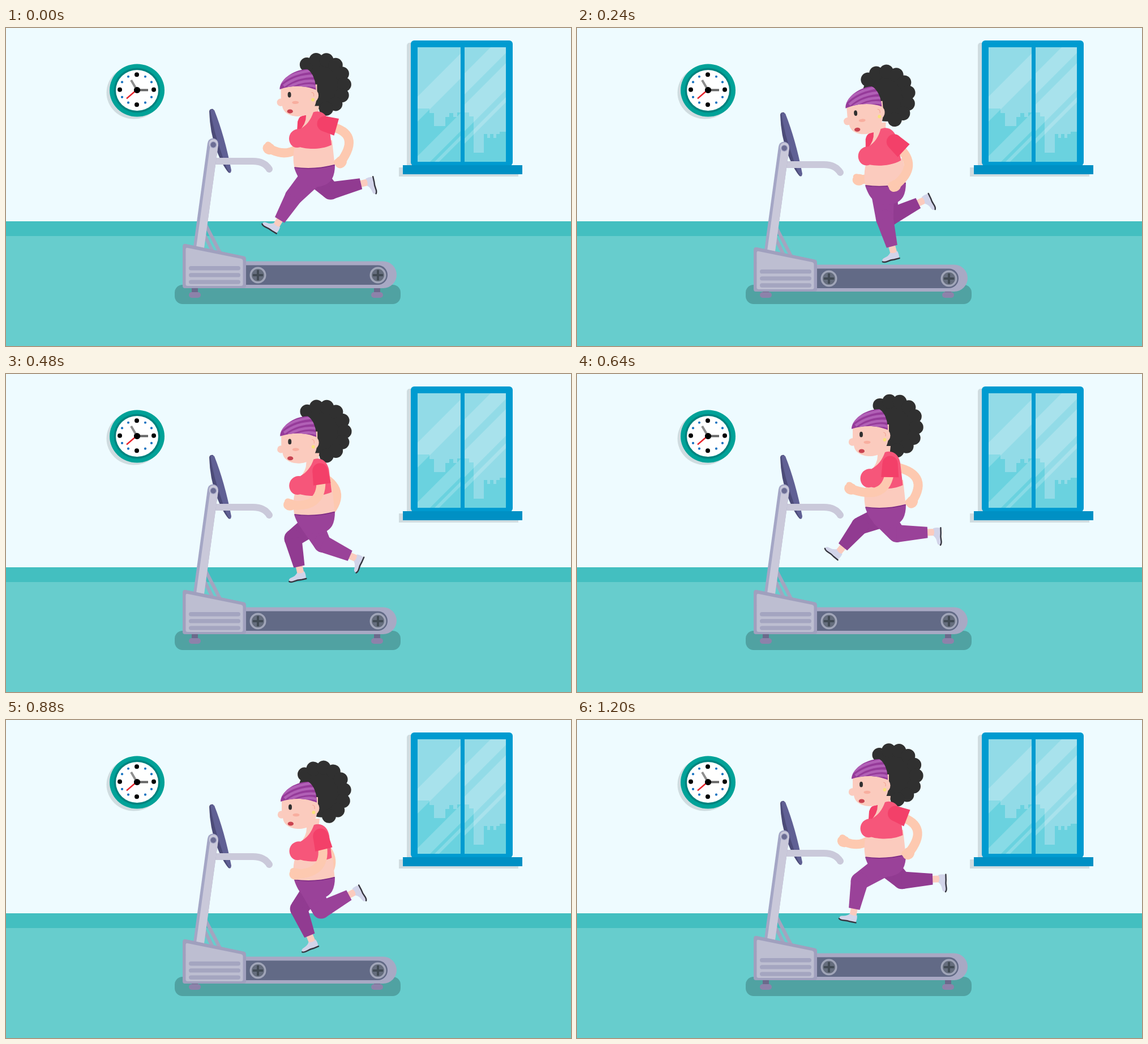
Recreate the animation shown at these times as an HTML page with a canvas. Size 998x561 px, loop 1.28 s.

```html
<!DOCTYPE html>
<html lang="en">
<head>
<meta charset="utf-8">
<title>Treadmill run</title>
<style>
html, body { margin: 0; width: 100%; height: 100%; overflow: hidden; background: #eefbff; }
canvas { display: block; width: 100vw; height: 100vh; }
</style>
</head>
<body>
<canvas id="stage" width="998" height="561"></canvas>
<script>
const g = document.getElementById('stage').getContext('2d');
const STEP = 80, COUNT = 16, RAD = Math.PI / 180;
const SKIN = '#fbcbbe', ARM = '#fdc9b0', NEAR = '#9a4299', FAR = '#913b91';
const TOP = '#f6567a', SLEEVE = '#f34069', HAIR = '#303030';

// Periodic smooth curve through a few [step, value] keys
function curve(times, values) {
  const n = times.length;
  const time = i => times[(i + n) % n] + Math.floor(i / n) * COUNT;
  const value = i => values[(i + n) % n];
  const slope = i => (value(i + 1) - value(i - 1)) / (time(i + 1) - time(i - 1));
  return s => {
    let i = n - 1;
    while (times[i] > s) i--;
    const h = time(i + 1) - time(i), u = (s - time(i)) / h, v = 1 - u;
    return value(i) * (1 + 2 * u) * v * v + value(i + 1) * u * u * (3 - 2 * u) +
      h * (slope(i) * u * v * v - slope(i + 1) * u * u * v);
  };
}

// Body height in pixels, limb angles in degrees from straight down, forward positive
const drop = curve([0, 2, 5, 8, 11, 13, 14, 15], [0, 35, 12, -11, 36, 3, -12, -4]);
const angle = (...values) => curve([0, 2, 5, 8, 11, 13, 15], values);
const nearThigh = angle(42, 6, -20, -39, -24, 53, 57);
const nearShin = angle(31, 3, -51, -92, -118, -46, 11);
const farThigh = angle(-45, -31, 39, 68, 38, -21, -46);
const farShin = angle(-103, -138, -47, 39, -22, -33, -92);

const clamp = x => Math.min(1, Math.max(0, x));

function fill(color, d) { g.fillStyle = color; g.fill(new Path2D(d)); }
function line(color, w, d, cap = 'butt') {
  g.strokeStyle = color; g.lineWidth = w; g.lineCap = cap; g.lineJoin = 'round';
  g.stroke(new Path2D(d));
}
function rect(color, x0, y0, x1, y1, r = 0) {
  g.fillStyle = color; g.beginPath(); g.roundRect(x0, y0, x1 - x0, y1 - y0, r); g.fill();
}
function oval(color, x, y, rx, ry = rx) {
  g.fillStyle = color; g.beginPath(); g.ellipse(x, y, rx, ry, 0, 0, 7); g.fill();
}
function group(x, y, deg, draw) {
  g.save(); g.translate(x, y); g.rotate(deg * RAD); draw(); g.restore();
}
function spin(x, y, deg, draw) {
  group(x, y, deg, () => { g.translate(-x, -y); draw(); });
}

function room() {
  rect('#eefbff', 0, 0, 998, 341);
  rect('#43bfc0', 0, 341, 998, 367);
  rect('#67cdcd', 0, 367, 998, 561);
}

function clock() {
  oval('#d0dce0', 226, 114, 48.5, 46.5);
  oval('#00a298', 231.5, 110, 48.5, 46.5);
  oval('#00837f', 231.5, 110, 41, 39.5);
  oval('#fff', 231.5, 110, 37.5, 36);
  for (let i = 0; i < 12; i++) {
    const a = i * 30 * RAD, big = i % 3 === 0;
    oval(big ? '#000' : '#1672c0', 231 + 30 * Math.cos(a), 108.7 + 26.5 * Math.sin(a), big ? 4 : 2.1);
  }
  line('#8e8e8e', 4, 'M231 109L221 92');
  line('#666', 4, 'M231 109.5H251');
  line('#e8242c', 2.4, 'M231 109L213 124.5');
  oval('#000', 231.5, 109.5, 5.6);
}

// Glass with the skyline and diagonal glints, each glint given by its range of x + y
function pane(x0, x1, glints) {
  g.save();
  g.beginPath(); g.rect(x0, 34, x1 - x0, 202); g.clip();
  rect('#92dbe7', x0, 34, x1, 236);
  fill('#6ad2df', 'M727 236V142H748V150H756V173H776V157H783V150H790V157H797V149H818V156H826V220H844V187H850V194H855V187H861V194H866V187H872V183H883V236Z');
  g.globalAlpha = .2;
  for (const [a, b] of glints)
    fill('#fff', `M${a - 34} 34H${b - 34}L${b - 236} 236H${a - 236}Z`);
  g.restore();
}

function windowFrame() {
  rect('#d0dce0', 708, 26, 740, 250, 5);
  rect('#d0dce0', 694, 246, 905, 262);
  rect('#009bd0', 715, 22, 895, 243, 6);
  pane(727, 803, [[848, 892], [953, 985], [993, 1001]]);
  pane(810, 883, [[890, 927], [945, 992], [1005, 1014]]);
  rect('#0090c4', 701, 242, 912, 258);
}

function machine(dy) {
  rect('#50a2a2', 298, 453, 697, 487, 14);
  for (const x of [333.5, 655.5]) {
    rect('#6a6a8c', x - 5.5, 456, x + 5.5, 468);
    rect('#8d82aa', x - 10.5, 466, x + 10.5, 476, 5);
  }
  g.save(); g.translate(0, dy);
  fill('#4c4b78', 'M359 147Q360 142 366 143L397 251Q397 257 393 255Q383 244 372 216Q360 184 359 147Z');
  fill('#606094', 'M361 145Q363 142 368 145Q386 190 398 251Q397 257 395 255Q389 249 381 222Q366 180 361 145Z');
  line('#a4a4bf', 6, 'M353 348L379 398M348 360L366 396');
  line('#cac9da', 12, 'M368 235H436C452 235 460 241 465 249', 'round');
  line('#a4a6c5', 19, 'M365.5 204L340 390');
  oval('#a4a6c5', 365.5, 204, 9.5);
  line('#cac9da', 14, 'M368 205L342.5 391');
  oval('#cac9da', 366.5, 204.5, 8);
  oval('#a4a6c5', 366.2, 206, 6);
  oval('#6c6d94', 366.2, 206, 4.7);

  rect('#a8a9c4', 415, 411.5, 690, 459, [0, 24, 24, 0]);
  rect('#626a86', 420, 418.5, 674, 453, [0, 17, 17, 0]);
  for (const x of [445, 657]) {
    oval('#a0a5b8', x, 436, 14.5);
    oval('#656d7d', x, 436, 11);
    line('#424b55', 4, `M${x - 9} 436h18M${x} 427v18`);
  }
  fill('#a0a0be', 'M312 386Q312 380 318 381L420 402.5Q424 403 424 408V455Q424 459 420 459H316Q312 459 312 455Z');
  fill('#bdbed1', 'M317.5 391Q317.5 387 321 388L415 407Q418.5 408 418.5 411V452Q418.5 455 415 455H321Q317.5 455 317.5 452Z');
  for (let y = 420; y < 450; y += 12.2) rect('#a4a5c0', 323, y, 414, y + 7.4, 3.7);
  g.restore();
}

// Tapered chain of [x, y, radius] with a flat end
function limb(color, pts) {
  for (let i = 0; i < pts.length - 1; i++) {
    const [x, y, r] = pts[i], [X, Y, R] = pts[i + 1];
    const d = Math.hypot(X - x, Y - y), nx = (y - Y) / d, ny = (X - x) / d;
    oval(color, x, y, r);
    g.beginPath();
    g.moveTo(x + nx * r, y + ny * r); g.lineTo(X + nx * R, Y + ny * R);
    g.lineTo(X - nx * R, Y - ny * R); g.lineTo(x - nx * r, y - ny * r);
    g.fill();
  }
}

// Thigh and shin change length a little with their angle
function leg(color, x, y, thigh, shin) {
  const reach = (px, py, len, a) => [px - len * Math.sin(a * RAD), py + len * Math.cos(a * RAD)];
  const knee = reach(x, y, 43 + thigh * .1, thigh);
  const cuff = reach(...knee, 50 - shin * .05, shin);
  group(...cuff, shin, () => {
    rect(SKIN, -6, -3, 6, 15);
    fill('#d2d4e9', 'M-6 10Q1 14 7 10Q9 17 7 23H-22Q-25 17 -17 16Q-10 15 -6 10Z');
    line('#35353f', 2.4, 'M-23 22Q-20 24.5 -14 23.5T-2 23.5H7.5', 'round');
  });
  limb(color, [[x, y, 20], [...knee, 15.5], [...cuff, 9.8]]);
}

// u runs from 0, hand in front, to 1, hand behind
function arm(u, sx, bx, bend, wx, swing, withSleeve) {
  const sy = 172, by = 236 - 55 * u * u, wy = 244 - 80 * (u - .6) ** 2;
  bx += bend * u;
  wx += swing * u;
  line(ARM, 16, `M${sx} ${sy}Q${bx} ${by} ${wx} ${wy}`, 'round');
  group(wx, wy, Math.atan2(wy - by, wx - bx) / RAD, () => {
    oval(ARM, 6, 0, 11.5, 10);
    oval(ARM, 10, 6, 6, 5);
  });
  if (!withSleeve) return;
  const d = Math.hypot(bx - sx, by - sy);
  limb(SLEEVE, [[sx, sy - 3, 13.5], [sx + (bx - sx) / d * 21, sy + (by - sy) / d * 21, 15.5]]);
}

function hair() {
  oval(HAIR, 558, 100, 41, 44);
  for (let i = 0; i < 9; i++) {
    const a = (i * 25.6 - 127) * RAD;
    oval(HAIR, 558 + 41 * Math.cos(a), 100 + 44 * Math.sin(a), 12.5);
  }
}

function head() {
  fill(SKIN, 'M487 102V124L489 136C490 151 506 156.5 519 156C540 155 549 142 551 118V100Z');
  oval(SKIN, 486.5, 131, 6.7);
  oval('#f8ae9f', 512.5, 131.5, 6, 2.7);
  oval(HAIR, 502, 117.7, 3, 4.9);
  oval('#c94350', 502.8, 147, 5.2, 3.6);
  g.save();
  g.clip(new Path2D('M485 108C485 92 508 73 534 73C544 79 549 94 549 110C530 101 506 101 485 108Z'));
  rect('#963b9a', 480, 65, 555, 115);
  for (let i = 0; i < 4; i++)
    line('#b160b6', 4.6, `M${484 + 8 * i} ${99 + 3 * i}Q${507 + 9 * i} ${76 + 7 * i} 552 ${75 + 10 * i}`);
  g.restore();
  oval(SKIN, 544.5, 119.5, 9, 11);
  line('#f3a696', 1.2, 'M541 114Q546 114 545 121');
  oval('#f8e27c', 543.5, 127, 3);
}

function belly() {
  fill(NEAR, 'M509 246Q545 252 581 241Q581 257 576 266C568 280 545 284 530 277C518 270 512 256 509 246Z');
  fill(SKIN, 'M512 203C506 219 507 237 509.5 246Q545 251 580.5 241L576 198Z');
  line('#7b2a82', 1.6, 'M509.5 246Q545 251 580.5 241.5');
}

function chest(farSleeve) {
  if (farSleeve) fill(SLEEVE, 'M532 154Q519 153 516 165L515 179H521L534 166Z');
  fill(SKIN, 'M531 138L554 138L552 156L540 176L518 182Q531 170 531 155Z');
  fill(TOP, 'M544 149C560 144 569 156 571 168L575.5 207C556 216 532 214 520 210.5C507 214 500.5 204 500.5 195C501 184 510 177 520 178.5C532 172 539 163 544 149Z');
}

function runner(s) {
  const y = drop(s);
  const back = .5 + .5 * Math.cos((s - .2) / COUNT * 2 * Math.PI);
  const lean = -4.5 * Math.exp(-(((s - 2.8) / 2) ** 2));
  g.save(); g.translate(0, y);
  arm(1 - back, 545, 515, 109, 470, 125);
  spin(505, 245, lean, () => spin(520, 110 - y * .1, -y * .2, () => {
    g.translate(0, -y * .1);
    hair();
  }));
  leg(FAR, 546, 260, farThigh(s), farShin(s));
  leg(NEAR, 540, 262, nearThigh(s), nearShin(s));
  belly();
  spin(505, 245, lean, () => {
    chest(back > .7);
    head();
  });
  arm(back, 553 + 10 * back, 552, 76, 489, 106, true);
  g.restore();
}

function frame(now) {
  const s = Math.floor(now / STEP) % COUNT;
  room();
  clock();
  windowFrame();
  machine(6 * clamp((drop(s) - 14) / 18));
  runner(s);
}

let start;
function tick(now) {
  start ??= now;
  frame(Math.max(0, now - start));
  requestAnimationFrame(tick);
}
frame(0);
requestAnimationFrame(tick);
</script>
</body>
</html>
```
